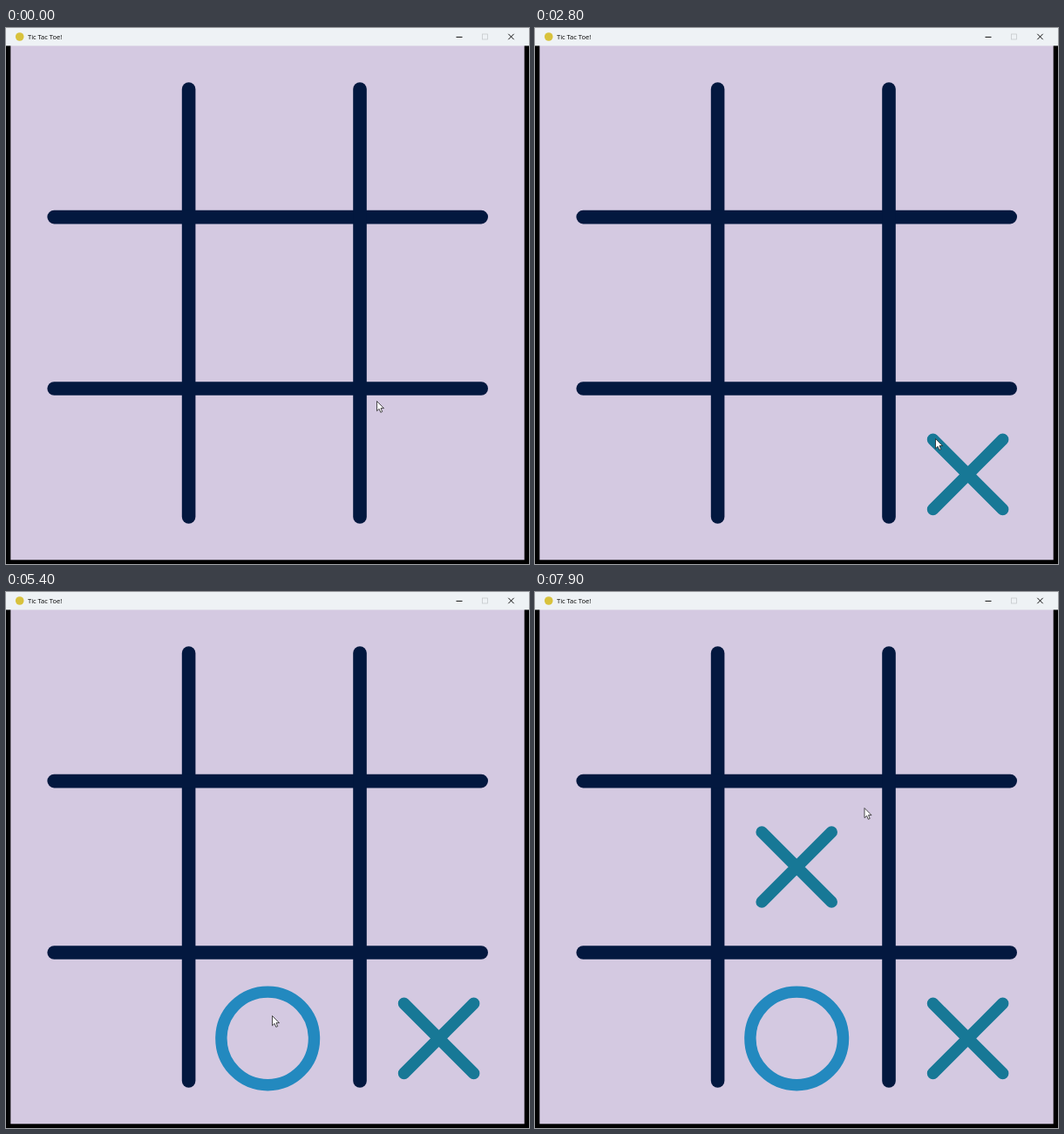
Write an HTML page that moves like this. It is 600x614 px and loops after 8 s.

```html
<!DOCTYPE html>
<html lang="en">
<head>
<meta charset="utf-8">
<title>Tic Tac Toe!</title>
<style>
  html, body { margin: 0; width: 100%; height: 100%; overflow: hidden; background: #000; }
  svg { display: block; width: 100%; height: 100%; }
  text { font: 7.5px "Open Sans", "Noto Sans", sans-serif; fill: #000; }
</style>
</head>
<body>
<svg viewBox="0 0 600 614">
  <rect width="600" height="614" fill="#000"/>
  <rect x="5.3" y="20" width="589.4" height="589.3" fill="#d4c9e1"/>
  <rect width="600" height="20.4" fill="#eef2f5"/>
  <circle cx="15.7" cy="10" r="4.8" fill="#d8c23c"/>
  <text x="25" y="13">Tic Tac Toe!</text>
  <g fill="none" stroke="#111">
    <path d="M516.5 10.4h7"/>
    <rect x="546.5" y="7" width="6" height="6" stroke="#c6c9cc" stroke-width=".8"/>
    <path d="M576.3 6.8l6.4 6.4m0-6.4l-6.4 6.4"/>
  </g>
  <g id="board" fill="none" stroke-linecap="round"></g>
  <path id="cursor" d="M0 0V11.2L2.6 8.8 4.3 12.8 6.2 12 4.5 8.1H8Z" fill="#fff" stroke="#222" stroke-width=".8"/>
</svg>
<script>
  const LOOP = 8000, STEP = 100;
  const CELL = 196.4, MID = { x: 300.2, y: 315 };
  const board = document.getElementById("board");
  const cursor = document.getElementById("cursor");

  function stroke(d, color, width) {
    const p = document.createElementNS("http://www.w3.org/2000/svg", "path");
    p.setAttribute("d", d);
    p.setAttribute("stroke", color);
    p.setAttribute("stroke-width", width);
    return board.appendChild(p);
  }

  // Bars sit one cell apart and span the board
  const HALF = 245;
  for (const i of [0, 1]) {
    stroke(`M${209.6 + i * CELL} ${MID.y - HALF}v${2 * HALF}`, "#03183f", 15.6);
    stroke(`M${MID.x - HALF} ${216.6 + i * CELL}h${2 * HALF}`, "#03183f", 15.6);
  }

  const cross = (x, y) =>
    stroke(`M${x - 40} ${y - 40}l80 80m0-80l-80 80`, "#177896", 13.6);
  const ring = (x, y, r = 53.3) =>
    stroke(`M${x - r} ${y}a${r} ${r} 0 1 1 ${2 * r} 0a${r} ${r} 0 1 1 ${-2 * r} 0`, "#2389bf", 13.4);

  // Columns and rows count from the middle cell
  const mark = (shape, col, row, at) =>
    ({ node: shape(MID.x + col * CELL, MID.y + row * CELL), at });
  const marks = [
    mark(cross, 1, 1, 2200),
    mark(ring, 0, 1, 5200),
    mark(cross, 0, 0, 6400)
  ];

  const home = { x: 425.5, y: 427.5 };
  const moves = [
    { from: 300, to: 800, x: 459.5, y: 470.5 },
    { from: 2900, to: 3800, x: 450.5, y: 472.5 },
    { from: 3800, to: 4800, x: 305.5, y: 485.5 },
    { from: 5400, to: 6200, x: 302.5, y: 387.5 },
    { from: 6200, to: 6600, x: 299.5, y: 352 },
    { from: 7400, to: 7900, x: 378, y: 247.5 }
  ];
  const ease = u => u * u * (3 - 2 * u);

  function cursorAt(t) {
    let { x, y } = home;
    for (const m of moves) {
      const u = ease(Math.max(0, Math.min(1, (t - m.from) / (m.to - m.from))));
      x += (m.x - x) * u;
      y += (m.y - y) * u;
    }
    return [x, y];
  }

  function draw(now) {
    const t = Math.floor((now % LOOP) / STEP) * STEP;
    cursor.setAttribute("transform", `translate(${cursorAt(t)})`);
    for (const { node, at } of marks) node.style.display = t >= at ? "" : "none";
  }

  const start = performance.now();
  function tick() {
    draw(performance.now() - start);
    requestAnimationFrame(tick);
  }
  tick();
</script>
</body>
</html>
```
